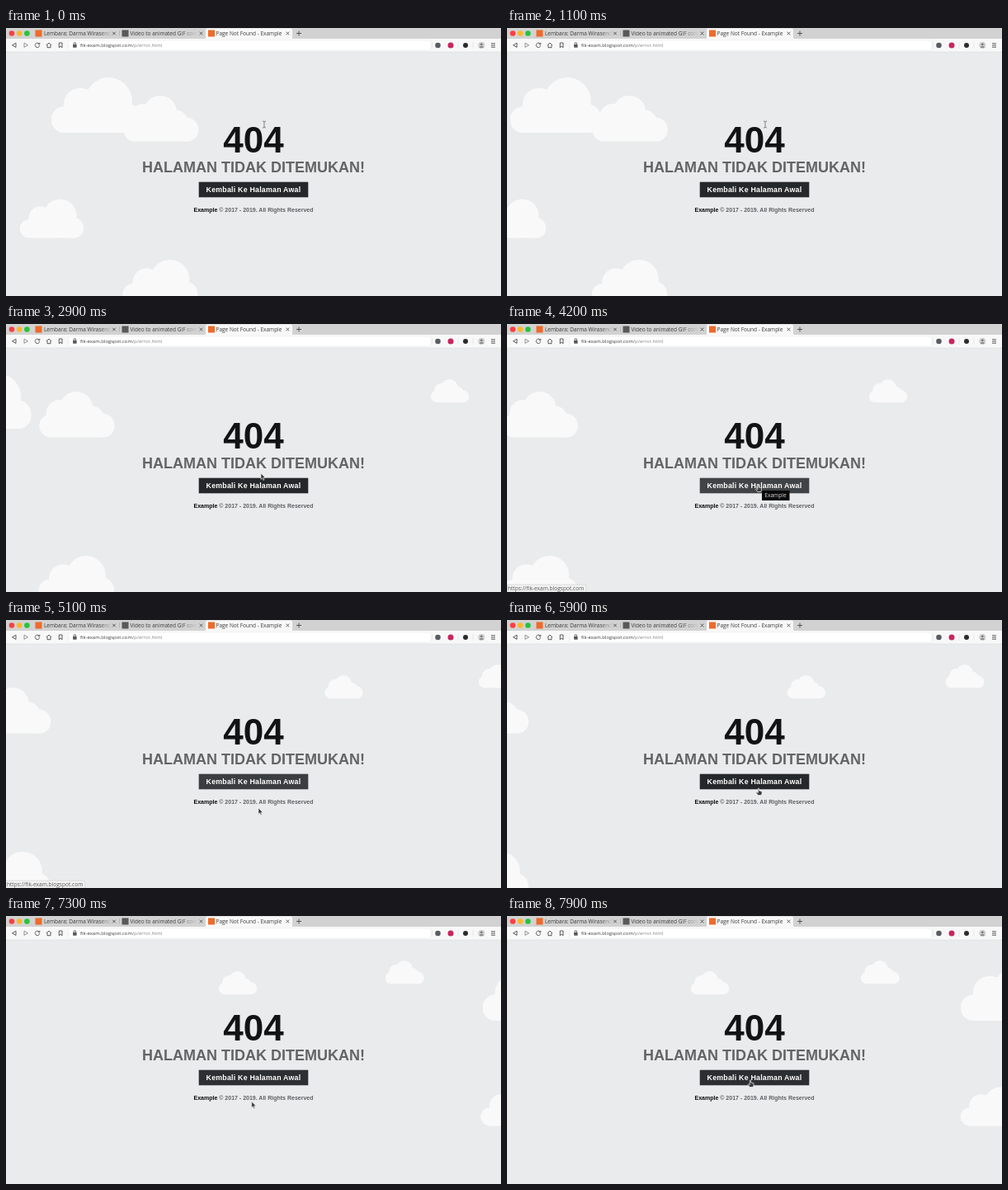
Recreate the animation shown at these times as an HTML page. Size 600 px wide and 325 px high, loop 8 s.

```html
<!DOCTYPE html>
<html lang="id">
<head>
<meta charset="utf-8">
<title>404</title>
<style>
  html, body { margin: 0; width: 100%; height: 100%; overflow: hidden; background: #e9ebec; }
  svg { display: block; }
  .ui { font-family: "Open Sans", "Noto Sans", sans-serif; font-size: 6.5px; fill: #3c3c3c; }
  .page { font-family: "Liberation Sans", Arial, sans-serif; font-weight: bold; text-anchor: middle; }
  .icon { fill: none; stroke: #4a4a4a; stroke-width: .9; stroke-linejoin: round; }
</style>
</head>
<body>
<svg width="600" height="325" viewBox="0 0 600 325">
  <defs>
    <g id="tall" fill="#faf9fa">
      <rect y="33" width="100" height="28" rx="14"/>
      <circle cx="14" cy="46" r="14"/>
      <circle cx="32" cy="30" r="18.5"/>
      <circle cx="63" cy="26" r="26"/>
      <circle cx="84" cy="45" r="16"/>
    </g>
    <g id="wide" fill="#faf9fa">
      <rect y="31" width="100" height="30" rx="15"/>
      <circle cx="15" cy="45" r="15"/>
      <circle cx="27" cy="29" r="18"/>
      <circle cx="49" cy="22" r="22"/>
      <circle cx="69" cy="36" r="17"/>
      <circle cx="84" cy="45" r="16"/>
    </g>
    <linearGradient id="fade" gradientUnits="userSpaceOnUse" x1="0" x2="242" y1="0" y2="0">
      <stop offset=".47" stop-color="#d2d2d2" stop-opacity="0"/>
      <stop offset=".53" stop-color="#d2d2d2"/>
    </linearGradient>
    <linearGradient id="fade2" gradientUnits="userSpaceOnUse" x1="212" x2="232" y1="0" y2="0">
      <stop offset="0" stop-color="#d2d2d2" stop-opacity="0"/>
      <stop offset="1" stop-color="#d2d2d2"/>
    </linearGradient>
  </defs>

  <rect width="600" height="325" fill="#e9ebec"/>
  <g id="sky"></g>

  <g class="page">
    <text x="300" y="151" font-size="44" fill="#121315">404</text>
    <text x="300" y="174.7" font-size="18" fill="#636466">HALAMAN TIDAK DITEMUKAN!</text>
    <rect id="button" x="233.7" y="186.7" width="132.6" height="18.6"/>
    <text x="300" y="199.2" font-size="8.8" letter-spacing=".23" fill="#fff">Kembali Ke Halaman Awal</text>
    <text x="300" y="222.8" font-size="7" fill="#606164"><tspan fill="#0c0c0c">Example</tspan> © 2017 - 2019. All Rights Reserved</text>
  </g>

  <g class="ui">
    <rect width="600" height="13.5" fill="#d2d2d2"/>
    <rect y="13" width="600" height="16" fill="#f8f8f8"/>
    <path d="M0 29H600" stroke="#dcdddd" stroke-width=".7"/>
    <path d="M241 13.5Q242 13 242 11V2.5Q242 .5 244 .5H345Q347 .5 347 2.5V11Q347 13 348 13.5Z" fill="#f8f8f8"/>
    <circle cx="7" cy="6.5" r="3.3" fill="#fb3f45"/>
    <circle cx="16.2" cy="6.5" r="3.3" fill="#fbb72c"/>
    <circle cx="25.4" cy="6.5" r="3.3" fill="#27c33c"/>
    <rect x="35.5" y="2.5" width="8" height="8" fill="#ee6a2a"/>
    <rect x="140.5" y="2.5" width="8" height="8" fill="#59595b"/>
    <rect x="245" y="2.5" width="8" height="8" fill="#ee6a2a"/>
    <text x="46" y="8.8">Lembara: Darma Wirasendjo</text>
    <rect x="113" y="1" width="25" height="12" fill="url(#fade)"/>
    <text x="150.5" y="8.8">Video to animated GIF conv</text>
    <rect x="212" y="1" width="28" height="12" fill="url(#fade2)"/>
    <text x="254.5" y="8.8">Page Not Found - Example</text>
    <path d="M137.5 3V10" stroke="#aaa" stroke-width=".6"/>
    <g id="closers" class="icon"></g>
    <path class="icon" d="M352 6.5H358M355 3.5V9.5"/>

    <g class="icon">
      <path d="M12 18.2V23.4L7.5 20.8Z"/>
      <path d="M22 18.2V23.4L26.5 20.8Z" stroke="#8a8a8a"/>
      <path d="M40 19A2.7 2.7 0 1 0 40.7 21.2M40.8 17.8V19.8H38.8"/>
      <path d="M49 21L52 18L55 21M50 20.5V23.7H54V20.5"/>
      <path d="M64.3 18H68V23.8L66.1 22.2L64.3 23.8Z"/>
    </g>
    <rect x="76" y="15" width="439" height="12" rx="2" fill="#fff" stroke="#e4e4e4" stroke-width=".5"/>
    <rect x="81.2" y="20" width="4.4" height="3.7" fill="#555"/>
    <path class="icon" d="M82.2 20V18.8A1.2 1.2 0 0 1 84.6 18.8V20"/>
    <text x="90" y="23" font-size="5.95" style="font-size:5.95px">fik-exam.blogspot.com<tspan fill="#858585">/p/error.html</tspan></text>
    <path d="M516.5 17V25M548 17V25M566 17V25" stroke="#ddd" stroke-width=".6"/>
    <circle cx="523.5" cy="21" r="3.3" fill="#5a5c66"/>
    <circle cx="539" cy="21" r="3.5" fill="#c8275a"/>
    <circle cx="557" cy="21" r="3" fill="#2c2c2c"/>
    <circle cx="576.3" cy="21" r="4" fill="#cbccce"/>
    <circle cx="576.3" cy="19.8" r="1.4" fill="#77797c"/>
    <path d="M573.8 23.7A2.6 2.3 0 0 1 578.8 23.7Z" fill="#77797c"/>
    <path class="icon" d="M588 18.8H593M588 21H593M588 23.2H593"/>

    <g id="status">
      <path d="M0 316H94Q96 316 96 318V325H0Z" fill="#f1f1f1" stroke="#cfcfcf" stroke-width=".6"/>
      <text x="1" y="322.8" style="font-size:6.6px" fill="#5a5a5a">https://fik-exam.blogspot.com</text>
    </g>
    <g id="tip">
      <rect x="309" y="202" width="33.5" height="12" fill="#090909"/>
      <text x="312.3" y="210.4" style="font-size:6.6px;fill:#ddd">Example</text>
    </g>
  </g>

  <g id="cursor">
    <path id="ibeam" d="M-2-4Q0-4 0-3Q0-4 2-4M0-3V3M-2 4Q0 4 0 3Q0 4 2 4" fill="none" stroke="#666" stroke-width=".8"/>
    <path id="arrow" d="M0 0V7.4L1.7 5.9L2.9 8.5L4.1 8L2.9 5.4H5.2Z" fill="#333" stroke="#f5f5f5" stroke-width=".6"/>
    <path id="hand" d="M-.7 .3Q0-.4.7 .3V3L4 3.8V6.5L3.2 8.5H-.8L-3 5.4L-2.2 4.6L-.7 5.6Z" fill="#3a3c3d" stroke="#f5f5f5" stroke-width=".7"/>
  </g>
</svg>
<script>
const LOOP = 8000, STEP = 100;
const $ = id => document.getElementById(id);

// shape, x at start, y, width, px per second, first visible ms
const clouds = [
  ["tall", 55, 60, 110, 46.4, 0],
  ["wide", 142.3, 82, 91, 35.1, 0],
  ["tall", 17, 207.5, 77, 42.7, 0],
  ["tall", 141.3, 281, 91, 35, 0],
  ["wide", 684.4, 67, 46, 58.4, 2550],
  ["wide", 835.2, 54, 46.5, 51.4, 0],
  ["tall", 916.6, 60, 110, 46.4, 0],
  ["tall", 887.3, 207.5, 77, 42.7, 0]
];

// ms, x, y, pointer held until the next row
const path = [
  [0, 313, 117, "ibeam"], [2300, 313, 117, "ibeam"], [2500, 312, 145, "arrow"],
  [2900, 309, 181, "arrow"], [3100, 308, 188, "hand"], [3400, 304.5, 195, "hand"],
  [4800, 304.5, 195, "hand"], [5000, 305.5, 206, "arrow"], [5100, 306, 228, "arrow"],
  [5600, 306, 228, "arrow"], [5900, 305, 204, "hand"], [6100, 304.5, 195, "hand"],
  [6800, 304.5, 195, "hand"], [6950, 302, 206, "arrow"], [7200, 298, 226, "arrow"],
  [7600, 297, 222, "arrow"], [7800, 295, 204, "hand"], [7900, 295, 199, "hand"],
  [8000, 295, 198, "hand"]
];

const hover = [[0, 0], [3100, 0], [3500, 1], [5000, 1], [5500, 0], [5900, 0],
  [6300, 1], [6950, 1], [7450, 0], [7800, 0], [8000, .5]];

function sample(rows, t) {
  let i = 0;
  while (i < rows.length - 2 && t >= rows[i + 1][0]) i++;
  const a = rows[i], b = rows[i + 1];
  const k = (t - a[0]) / (b[0] - a[0]);
  return a.map((v, j) => typeof v === "number" ? v + (b[j] - v) * k : v);
}

const within = (t, ...spans) => spans.some(([a, b]) => t >= a && t < b);
const show = (id, on) => $(id).setAttribute("visibility", on ? "visible" : "hidden");

$("closers").innerHTML = [131, 236.5, 341.5]
  .map(x => `<path d="M${x - 1.8} 4.7l3.6 3.6m0-3.6l-3.6 3.6"/>`).join("");
$("sky").innerHTML = clouds.map(c => `<use href="#${c[0]}"/>`).join("");
const puffs = [...$("sky").children];

function draw(t) {
  clouds.forEach(([, x, y, w, speed, from], i) => {
    puffs[i].setAttribute("transform", `translate(${x - speed * t / 1000} ${y}) scale(${w / 100})`);
    puffs[i].setAttribute("visibility", t < from ? "hidden" : "visible");
  });

  const glow = sample(hover, t)[1] * 28;
  $("button").setAttribute("fill", `rgb(${37 + glow},${40 + glow},${42 + glow})`);

  const [, x, y, kind] = sample(path, t);
  $("cursor").setAttribute("transform", `translate(${x} ${y})`);
  for (const id of ["ibeam", "arrow", "hand"]) show(id, id === kind);

  show("status", within(t, [3200, 5300], [6000, 7250]));
  show("tip", within(t, [3900, 4800], [6500, 6900]));
}

const start = performance.now();
function tick() {
  const t = (performance.now() - start) % LOOP;
  draw(Math.floor(t / STEP) * STEP);
  requestAnimationFrame(tick);
}
draw(0);
requestAnimationFrame(tick);
</script>
</body>
</html>
```
